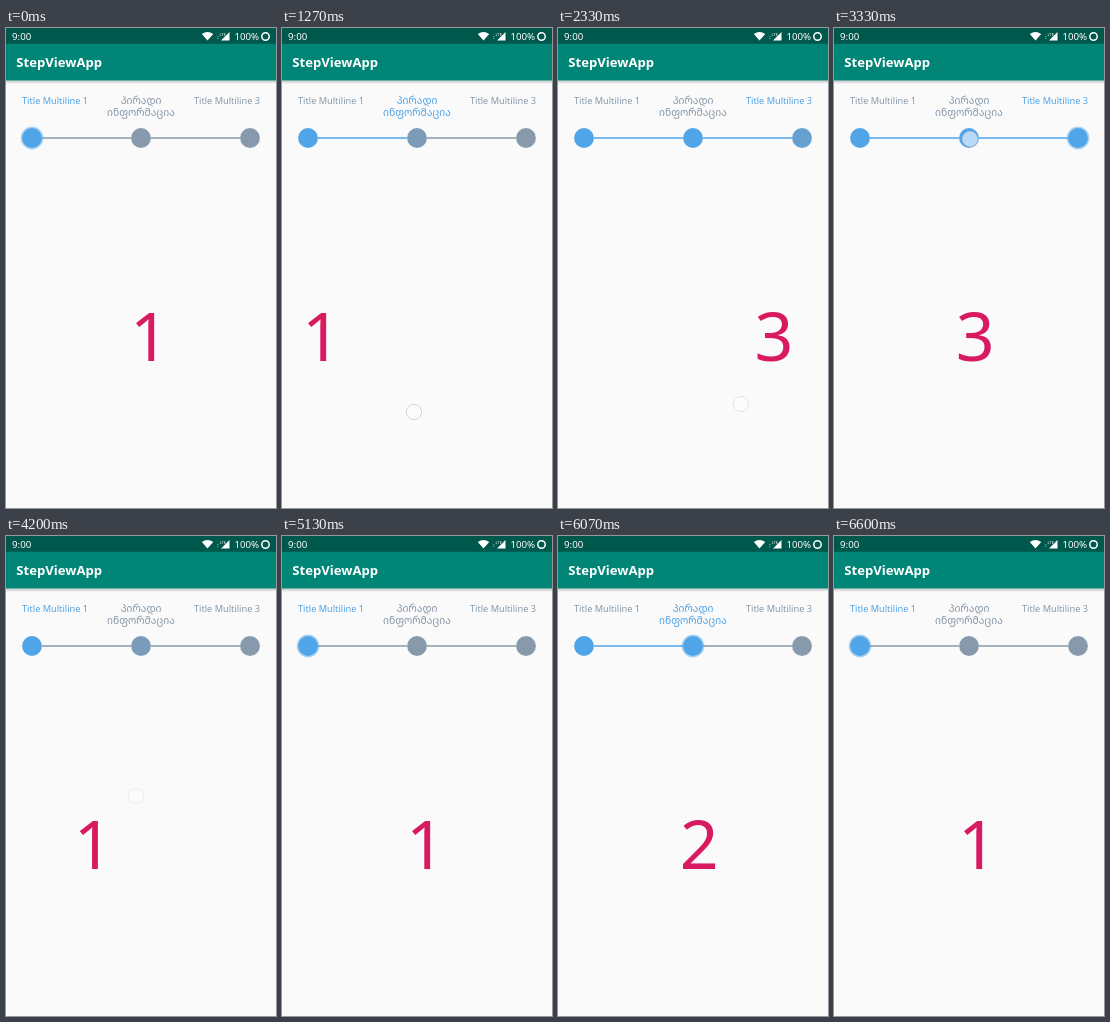
Recreate the animation shown at these times as an HTML page. Size 270 by 480 pixels, loop 6670 ms.

```html
<!DOCTYPE html>
<html lang="en">
<head>
<meta charset="utf-8">
<title>Step view</title>
<style>
  html, body { margin: 0; width: 100%; height: 100%; overflow: hidden; background: #fafafa; }
  svg { display: block; width: 100%; height: 100%; }
  text { font-family: "Noto Sans", "Open Sans", sans-serif; }
  .status { fill: #fff; font-size: 9.7px; }
  .title { font-size: 9.2px; }
  .geo { font-family: "Noto Sans Georgian", "DejaVu Sans", sans-serif; font-size: 10.3px; text-anchor: middle; }
  .digit { font-size: 68px; fill: #d81b60; text-anchor: middle; }
</style>
</head>
<body>
<svg viewBox="0 0 270 480">
  <defs>
    <linearGradient id="shade" x2="0" y2="1">
      <stop stop-color="#000" stop-opacity=".22"/>
      <stop offset="1" stop-color="#000" stop-opacity="0"/>
    </linearGradient>
  </defs>
  <rect width="270" height="480" fill="#fafafa"/>
  <rect y="52.5" width="270" height="3.5" fill="url(#shade)"/>
  <rect width="270" height="52.5" fill="#008577"/>
  <rect width="270" height="15.8" fill="#00574b"/>

  <text class="status" x="6" y="12">9:00</text>
  <path d="M201.5 12.5L195.8 6Q201.5 1.8 207.2 6ZM223.5 4V12.5H215Z" fill="#fff"/>
  <path d="M211.8 8v4" stroke="#fff" stroke-opacity=".6" stroke-dasharray="1 1"/>
  <text x="213.4" y="7.6" font-size="4" fill="#fff">LTE</text>
  <text class="status" x="228.5" y="12">100%</text>
  <circle cx="259.5" cy="8.5" r="3.7" fill="none" stroke="#fff" stroke-width="1.5"/>
  <text x="10.3" y="39" font-size="13.1" font-weight="700" fill="#fff">StepViewApp</text>

  <g class="label"><text class="title" x="16" y="76">Title Multiline 1</text></g>
  <g class="label">
    <text class="geo" x="135" y="76">პირადი</text>
    <text class="geo" x="135" y="88">ინფორმაცია</text>
  </g>
  <g class="label"><text class="title" x="254" y="76" text-anchor="end">Title Multiline 3</text></g>

  <path class="line" d="M36 110H125" stroke-width="1.7"/>
  <path class="line" d="M145 110H234" stroke-width="1.7"/>
  <circle id="glow" cy="110" r="11.4" fill="#50a4e8" fill-opacity=".45"/>
  <circle class="dot" cx="26" cy="110" r="9.9"/>
  <circle class="dot" cx="135" cy="110" r="9.9"/>
  <circle class="dot" cx="244" cy="110" r="9.9"/>

  <text class="digit" y="333">1</text>
  <text class="digit" y="333">2</text>
  <text class="digit" y="333">3</text>
  <circle id="touch" r="7.6" fill="#fff" fill-opacity=".6" stroke="#b9c3da" stroke-opacity=".85"/>
</svg>
<script>
const LOOP = 6670, PAGE = 270, FADE = 220, TINT = 200;
const BLUE = [80, 164, 232], GREY = [135, 153, 171];
const all = s => [...document.querySelectorAll(s)];
const labels = all('.label'), lines = all('.line'), dots = all('.dot'), digits = all('.digit');
const [glow, touch] = all('#glow, #touch');

// Swipes drag the page a little and then settle slowly; taps settle fast.
const swipe = (down, up, from, to, x0, x1, y, drag) =>
  ({ down, up, from, to, x0, x1, y, drag: drag / PAGE, settle: 600 });
const tap = (down, up, from, to, x, y) =>
  ({ down, up, from, to, x0: x, x1: x, y, drag: 0, settle: 200 });
const moves = [
  swipe(1060, 1226, 0, 1, 165, 132, 384, 25),
  swipe(2060, 2208, 1, 2, 226, 183, 376, 35),
  tap(3320, 3430, 2, 1, 136, 111),
  swipe(3920, 4050, 1, 0, 90, 130, 260, 30),
  tap(5660, 5810, 0, 1, 135, 111),
  tap(6260, 6360, 1, 0, 26, 111)
];

const clamp = v => Math.max(0, Math.min(1, v));
const mix = (a, b, k) => a + (b - a) * k;
const tint = k => `rgb(${GREY.map((g, i) => Math.round(mix(g, BLUE[i], k)))})`;
const set = (el, attrs) => { for (const a in attrs) el.setAttribute(a, attrs[a]); };

function draw(t) {
  let page = 0, from = 0, to = 0, k = 1, press = 0;
  for (const m of moves) {
    if (t < m.down) break;
    const pull = clamp((t - m.down) / (m.up - m.down)) ** 2;
    const left = (1 - clamp((t - m.up) / m.settle)) ** 5;
    page = mix(m.to, mix(m.from, m.to, m.drag * pull), left);
    press = 1 - clamp((t - m.up) / FADE);
    set(touch, { cx: mix(m.x0, m.x1, pull), cy: m.y });
    if (t >= m.up) {
      ({ from, to } = m);
      k = clamp((t - m.up) / TINT);
    }
  }
  set(touch, { opacity: press });
  set(glow, { cx: 26 + to * 109, opacity: k < 1 ? 0 : 1 });
  labels.forEach((el, i) => set(el, { fill: tint(i === to ? 1 : 0) }));
  lines.forEach((el, i) => set(el, { stroke: tint(i < to ? 1 : 0) }));
  dots.forEach((el, i) => {
    const end = i <= to ? 1 : 0, start = i <= from ? 1 : 0;
    set(el, { fill: tint(mix(start, end, k)) });
  });
  digits.forEach((el, i) => set(el, { x: (i ? 141.2 : 143.5) + (i - page) * PAGE }));
}

const start = performance.now();
function frame() {
  draw((performance.now() - start) % LOOP);
  requestAnimationFrame(frame);
}
frame();
</script>
</body>
</html>
```
